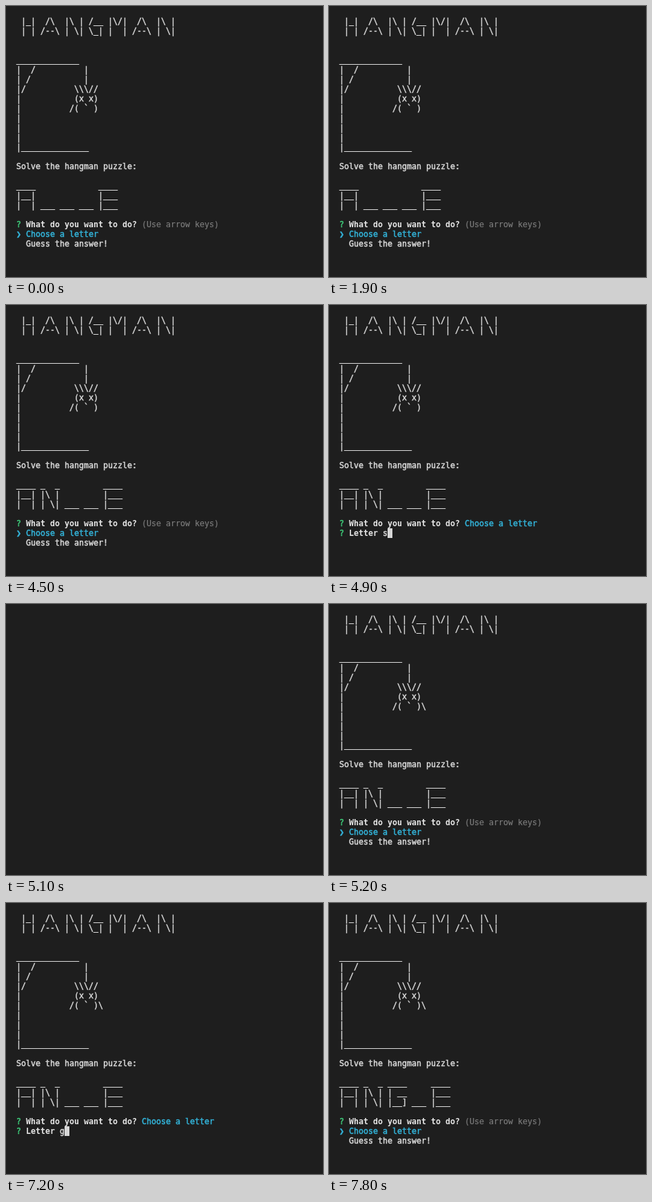
Write an HTML page that moves like this. It is 460 px wide and 392 px high and loops after 8 s.

```html
<!DOCTYPE html>
<html lang="en">
<head>
<meta charset="utf-8">
<title>Hangman</title>
<style>
  html, body { margin: 0; width: 100%; height: 100%; overflow: hidden; background: #1e1e1e; }
  pre {
    position: absolute; left: 15px; top: 15px; margin: 0;
    font: 11.63px/14px "DejaVu Sans Mono", monospace; color: #d9d9d9;
    -webkit-text-stroke: 0.45px;
  }
  b { color: #e5e5e5; -webkit-text-stroke: 0; }
  .mark { color: #3fd07c; }
  .cyan { color: #33b4da; }
  .tip { line-height: 0; }
  .hint { color: #7a7a7a; -webkit-text-stroke: 0.2px; }
  .cursor { display: inline-block; width: 7px; height: 14px; vertical-align: top; background: #d6d6d6; }
</style>
</head>
<body>
<pre id="screen">
 |_|  /\  |\ | /__ |\/|  /\  |\ |
 | | /--\ | \| \_| |  | /--\ | \|


_____________
|  /          |
| /           |
|/          \\\//
|           (x x)
|          /( ` )<span id="arm"></span>
|
|
|
|______________

Solve the hangman puzzle:

<span id="puzzle"></span>

<span id="prompt"></span></pre>
<script>
const LOOP = 8000;
const GLYPHS = {
  A: ["____", "|__|", "|  |"],
  N: ["_  _", "|\\ |", "| \\|"],
  G: ["____", "| __", "|__]"],
  E: ["____", "|___", "|___"],
  _: ["   ", "   ", "___"]
};

// typed: null shows the menu, a string shows the letter prompt
const STEPS = [
  { at: 0, word: "A___E", arm: "", typed: null },
  { at: 2000, typed: "" },
  { at: 2300, typed: "n" },
  { at: 2700, word: "AN__E", typed: null },
  { at: 4600, typed: "" },
  { at: 4900, typed: "s" },
  { at: 5100, hidden: true },
  { at: 5200, hidden: false, arm: "\\", typed: null },
  { at: 6700, typed: "" },
  { at: 7000, typed: "g" },
  { at: 7300, word: "ANG_E", typed: null }
];

const byId = id => document.getElementById(id);
const bigWord = word =>
  [0, 1, 2].map(row => [...word].map(c => GLYPHS[c][row]).join(" ")).join("\n");
const question = text => `<span class="mark">?</span> <b>${text}</b> `;

function promptHtml(typed) {
  const ask = question("What do you want to do?");
  if (typed === null) {
    return ask + '<span class="hint">(Use arrow keys)</span>\n' +
      '<span class="cyan"><span class="tip">❯</span> Choose a letter</span>\n  Guess the answer!';
  }
  return ask + '<span class="cyan">Choose a letter</span>\n' +
    question("Letter") + typed + '<span class="cursor"></span>';
}

let shown = 0;

function frame(now) {
  const time = now % LOOP;
  const passed = STEPS.filter(step => step.at <= time);
  if (passed.length !== shown) {
    shown = passed.length;
    const state = Object.assign({}, ...passed);
    byId("screen").style.visibility = state.hidden ? "hidden" : "visible";
    byId("arm").textContent = state.arm;
    byId("puzzle").textContent = bigWord(state.word);
    byId("prompt").innerHTML = promptHtml(state.typed);
  }
  requestAnimationFrame(frame);
}

frame(0);
</script>
</body>
</html>
```
